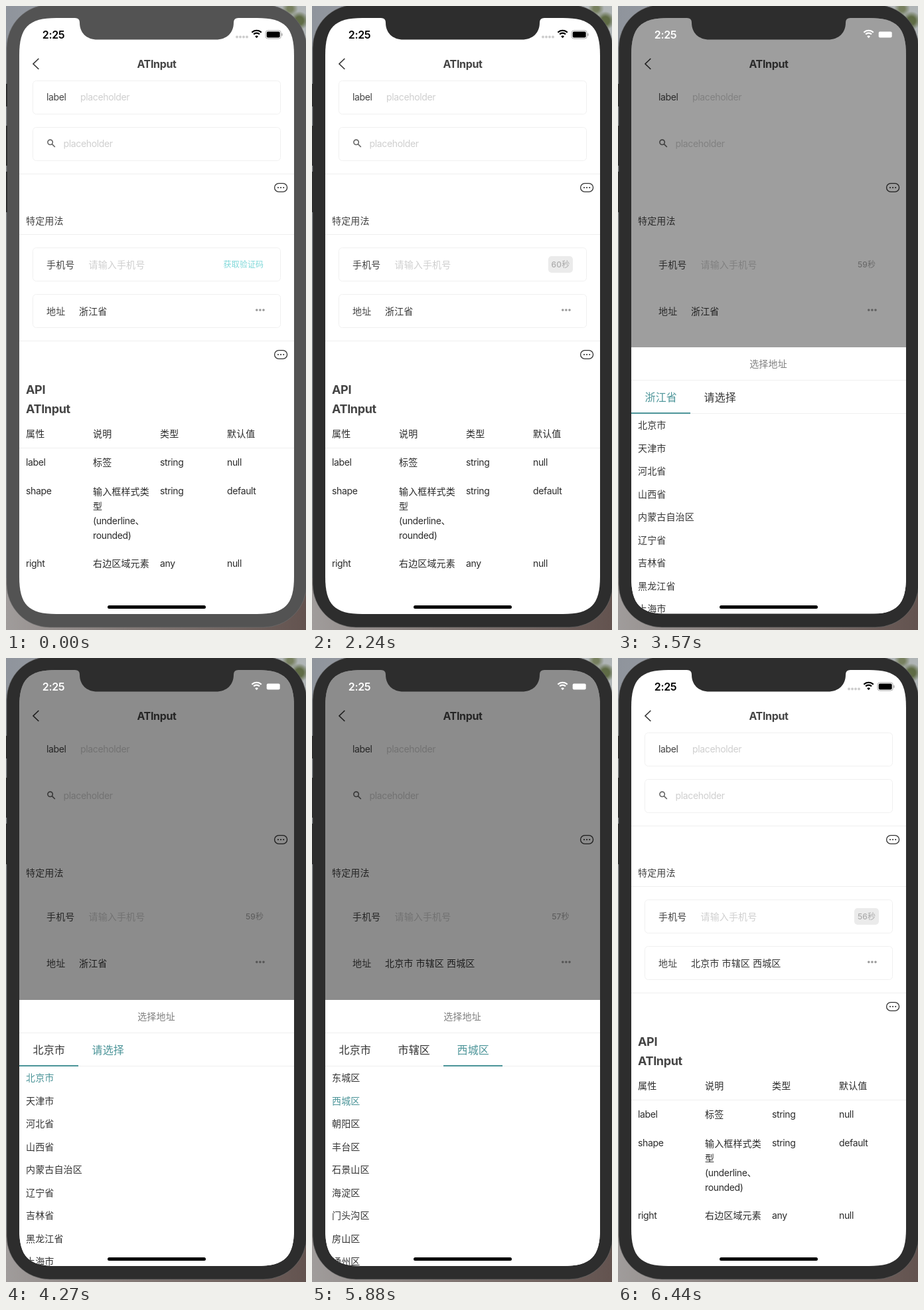
These frames come from a looping animation (452 px wide and 938 px high, 6650 ms). An HTML page:

```html
<!DOCTYPE html>
<html lang="zh-CN">
<head>
<meta charset="utf-8">
<title>ATInput</title>
<style>
  html, body { margin: 0; width: 100%; height: 100%; overflow: hidden; }
  body {
    background:
      radial-gradient(circle at 442px 22px, #5f6b45 0 6px, transparent 14px),
      radial-gradient(circle at 428px 4px, #77805f 0 4px, transparent 12px),
      linear-gradient(90deg, #a09c9b, #857b78 40%, #63534f) 0 860px / 452px 78px no-repeat,
      linear-gradient(90deg, #8f949c, #a3a6ab 50%, #b0b5b6);
  }
  svg { display: block; }
  text {
    font-family: Inter, "Noto Sans CJK SC", "Noto Sans CJK", "Noto Sans", sans-serif;
    letter-spacing: .15px;
    white-space: pre;
  }
  .latin { letter-spacing: -.35px; }
  .bezel, .status, .faint, .mask, .sheet, .pages, .bar, .cut { animation: 6650ms linear infinite; }
  .bezel { animation-name: dim; }
  .status { animation-name: invert; animation-timing-function: step-end; }
  .faint { animation-name: faint; animation-timing-function: step-end; }
  .mask { animation-name: mask; }
  .sheet { animation-name: sheet; }
  .pages { animation-name: pages; }
  .bar { animation-name: bar; }
  .cut { animation-timing-function: step-end; }

  @keyframes dim {
    0%, 12.93% { fill: #535353; }
    15.79%, 100% { fill: #2d2d2d; }
  }
  @keyframes invert {
    0% { color: #000; }
    50.526% { color: #fff; }
    94.2%, 100% { color: #000; }
  }
  /* pale lines and fills are lost while the mask is up */
  @keyframes faint {
    0% { opacity: 1; }
    50.526% { opacity: 0; }
    94.2%, 100% { opacity: 1; }
  }
  @keyframes mask {
    0%, 49.474% { opacity: 0; }
    53.684% { opacity: .38; }
    57.895%, 89.549% { opacity: .45; animation-timing-function: ease-in-out; }
    94.286%, 100% { opacity: 0; }
  }
  @keyframes sheet {
    0% { transform: translateY(896px); }
    49.173% {
      transform: translateY(896px);
      animation-timing-function: linear(0, .067, .247, .484, .716, .891, .987, 1.0175, 1.0126, 1.0024, 1);
    }
    53.91%, 89.853% { transform: translateY(0); animation-timing-function: ease-in-out; }
    94.589%, 100% { transform: translateY(896px); }
  }
  @keyframes pages {
    0%, 64.962% { transform: translateX(0); animation-timing-function: ease-in-out; }
    71.278%, 76.474% { transform: translateX(-414px); animation-timing-function: ease-in-out; }
    82.79%, 100% { transform: translateX(-828px); }
  }
  @keyframes bar {
    0%, 64.962% { transform: translateX(0); animation-timing-function: ease-in-out; }
    71.278%, 76.474% { transform: translateX(89px); animation-timing-function: ease-in-out; }
    82.79%, 100% { transform: translateX(178px); }
  }
</style>
</head>
<body>
<svg id="stage" width="452" height="938" viewBox="0 0 452 938"></svg>
<script>
const LOOP = 6650;
const TEAL = '#4b9498', DARK = '#333', HINT = '#cfcfcf';

// y is the vertical middle of the line
function text(x, y, str, o = {}) {
  const { size = 14, fill = '#444', weight = 400, anchor = 'start' } = o;
  const latin = /^[\x00-\x7f]/.test(str) && !/秒/.test(str);
  const base = y + size * (latin ? .35 : .38);
  return `<text x="${x}" y="${base}" font-size="${size}" fill="${fill}" font-weight="${weight}"
    text-anchor="${anchor}" class="${latin ? 'latin' : ''}">${str}</text>`;
}
const rect = (x, y, w, h, fill, rx = 0) =>
  `<rect x="${x}" y="${y}" width="${w}" height="${h}" rx="${rx}" fill="${fill}"/>`;
const dots = (x, y, gap, n, r, fill) => Array.from({ length: n }, (_, i) =>
  `<circle cx="${x + i * gap}" cy="${y}" r="${r}" fill="${fill}"/>`).join('');
const faint = content => `<g class="faint">${content}</g>`;
const rule = (y, x = 20) => rect(x, y, 414, 1, '#efefef');
const card = y => `<rect x="40.5" y="${y}.5" width="373" height="50" rx="5" fill="#fff" stroke="#f0f0f0"/>`;
const bubble = y => `<rect x="404.6" y="${y - 6.4}" width="19" height="12.8" rx="6.4" fill="none"
  stroke="#333" stroke-width="1.3"/>` + dots(410, y, 4.1, 3, 1.1, DARK);

// Rectangle with smooth, continuous corners
function smooth(x, y, w, h) {
  const r = 56, k = r - 14;
  return `<path d="M${x + r} ${y}h${w - 2 * r}c${k} 0 ${r} 14 ${r} ${r}v${h - 2 * r}
    c0 ${k} -14 ${r} ${-r} ${r}h${2 * r - w}c${-k} 0 ${-r} -14 ${-r} ${-r}v${2 * r - h}
    c0 ${-k} 14 ${-r} ${r} ${-r}z"/>`;
}

// Content that appears at a given time and covers what lies below it
const cuts = new Set();
function from(ms, content) {
  cuts.add(ms);
  return `<g class="cut" style="animation-name:cut${ms}">${content}</g>`;
}

function table() {
  const cols = [30, 131, 232, 333];
  const row = (y, cells) => cells.map((c, i) => text(cols[i], y, c, { fill: '#2a2a2a' })).join('');
  return row(643, ['属性', '说明', '类型', '默认值'])
    + row(686, ['label', '标签', 'string', 'null'])
    + row(729, ['shape', '', 'string', 'default'])
    + ['输入框样式类', '型', '(underline、', 'rounded)']
        .map((s, i) => text(131, 730 + i * 22, s, { fill: '#2a2a2a' })).join('')
    + row(838, ['right', '右边区域元素', 'any', 'null']);
}

function countdown() {
  const badge = n => rect(326, 375, 68, 27, '#fff') + faint(rect(356, 376, 37, 25, '#ebebeb', 5))
    + text(374.5, 388, n + '秒', { size: 12, fill: '#aaa', weight: 500, anchor: 'middle' });
  let out = text(327.5, 388, '获取验证码', { size: 12, fill: '#7fd8d9' });
  for (let i = 0; i < 5; i++) out += from(2240 + i * 1050, badge(60 - i));
  return out;
}

function page() {
  return rect(20, 18, 414, 896, '#fff')
    + '<path d="M49.3 79L41 87l8.3 8" fill="none" stroke="#333" stroke-width="1.6"/>'
    + text(227, 87, 'ATInput', { size: 16, weight: 700, anchor: 'middle' })
    + faint([112, 182, 363, 433].map(card).join('') + [252, 343, 503, 664].map(y => rule(y)).join(''))
    + text(61, 137, 'label') + text(112, 137.5, 'placeholder', { fill: HINT })
    + '<g fill="none" stroke="#666" stroke-width="1.6"><circle cx="66.6" cy="204.8" r="3.7"/><path d="M69.4 207.6l4.4 4.4"/></g>'
    + text(86.5, 207.5, 'placeholder', { fill: HINT })
    + bubble(273) + bubble(524)
    + text(30, 322.5, '特定用法')
    + text(61, 388.5, '手机号') + text(124.5, 388.5, '请输入手机号', { fill: HINT })
    + countdown()
    + text(61, 458.5, '地址') + text(110, 458.5, '浙江省', { fill: DARK })
    + from(5810, rect(105, 445, 150, 28, '#fff') + text(110, 458.5, '北京市 市辖区 西城区', { fill: DARK }))
    + dots(377.8, 457, 5.1, 3, 1.8, '#999')
    + text(30, 577, 'API', { size: 18, weight: 700 })
    + text(30, 606, 'ATInput', { size: 18, weight: 700 })
    + table();
}

function sheet() {
  const tab = (i, s, on) => rect(i * 89 + 2, 54, 85, 40, '#fff')
    + text(i * 89 + 20.5, 74.5, s, { size: 16, fill: on ? TEAL : DARK });
  const list = (n, items, pick, at) => items.map((s, i) => {
    const x = n * 414 + 10, y = 117 + i * 34.5;
    return text(x, y, s, { fill: DARK })
      + (i === pick ? from(at, rect(x - 1, y - 12, 90, 24, '#fff') + text(x, y, s, { fill: TEAL })) : '');
  }).join('');
  return rect(0, 0, 414, 400, '#fff')
    + text(206.5, 24.5, '选择地址', { fill: '#808080', anchor: 'middle' })
    + rule(49, 0) + rule(99, 0)
    + tab(0, '浙江省', true) + tab(1, '请选择', false)
    + from(4200, tab(0, '北京市', false) + tab(1, '请选择', true))
    + from(5040, tab(1, '市辖区', false) + tab(2, '请选择', true))
    + from(5810, tab(2, '西城区', true))
    + `<g class="bar">${rect(0, 98, 89, 2, TEAL)}</g>`
    + '<g class="pages">'
    + list(0, ['北京市', '天津市', '河北省', '山西省', '内蒙古自治区', '辽宁省', '吉林省', '黑龙江省', '上海市'], 0, 4200)
    + list(1, ['市辖区'], 0, 5040)
    + list(2, ['东城区', '西城区', '朝阳区', '丰台区', '石景山区', '海淀区', '门头沟区', '房山区', '通州区'], 1, 5810)
    + '</g>';
}

function statusBar() {
  const arc = r => {
    const d = r * .72;
    return `<path d="M${377.6 - d} ${47 - d}A${r} ${r} 0 0 1 ${377.6 + d} ${47 - d}"/>`;
  };
  return '<g class="status">'
    + text(71.5, 43, '2:25', { size: 16, weight: 600, fill: 'currentColor', anchor: 'middle' })
    + `<g fill="none" stroke="currentColor" stroke-width="2.2">${arc(10)}${arc(6.2)}</g>`
    + '<path d="M377.6 48.3l-2.4-2.6a3.4 3.4 0 0 1 4.8 0z" fill="currentColor"/>'
    + rect(392.7, 38.4, 20, 9.2, 'currentColor', 2)
    + '</g>' + faint(dots(348, 46.5, 5, 4, 1.9, '#ccc')
    + '<rect x="391" y="36.9" width="23.4" height="12.2" rx="3.6" fill="none" stroke="#aaa"/>'
    + rect(415.3, 41, 1.4, 4, '#aaa', .7));
}

document.getElementById('stage').innerHTML =
  '<clipPath id="screen">' + smooth(20, 18, 414, 896) + '</clipPath>'
  + '<rect class="bezel" x="1" y="-2" width="452" height="936" rx="65" stroke="#707070" stroke-opacity=".6"/>'
  + rect(0, 117, 2, 34, '#2d2d2d') + rect(0, 180, 2, 60, '#2d2d2d') + rect(0, 249, 2, 61, '#2d2d2d')
  + '<g clip-path="url(#screen)">' + page()
  + '<g class="mask">' + rect(20, 18, 414, 896, '#000') + '</g>'
  + '<g transform="translate(20 514)"><g class="sheet">' + sheet() + '</g></g>'
  + '</g>'
  + '<path class="bezel" d="M104 17v1q7 0 7 7c0 15 10 25.5 27 25.5H316c17 0 27-10.5 27-25.5q0-7 7-7v-1z"/>'
  + statusBar()
  + rect(153, 901, 148, 5, '#000', 2.5);

const style = document.createElement('style');
style.textContent = [...cuts].map(ms =>
  `@keyframes cut${ms}{0%{opacity:0}${(ms / LOOP * 100).toFixed(4)}%,100%{opacity:1}}`).join('\n');
document.head.append(style);
</script>
</body>
</html>
```
